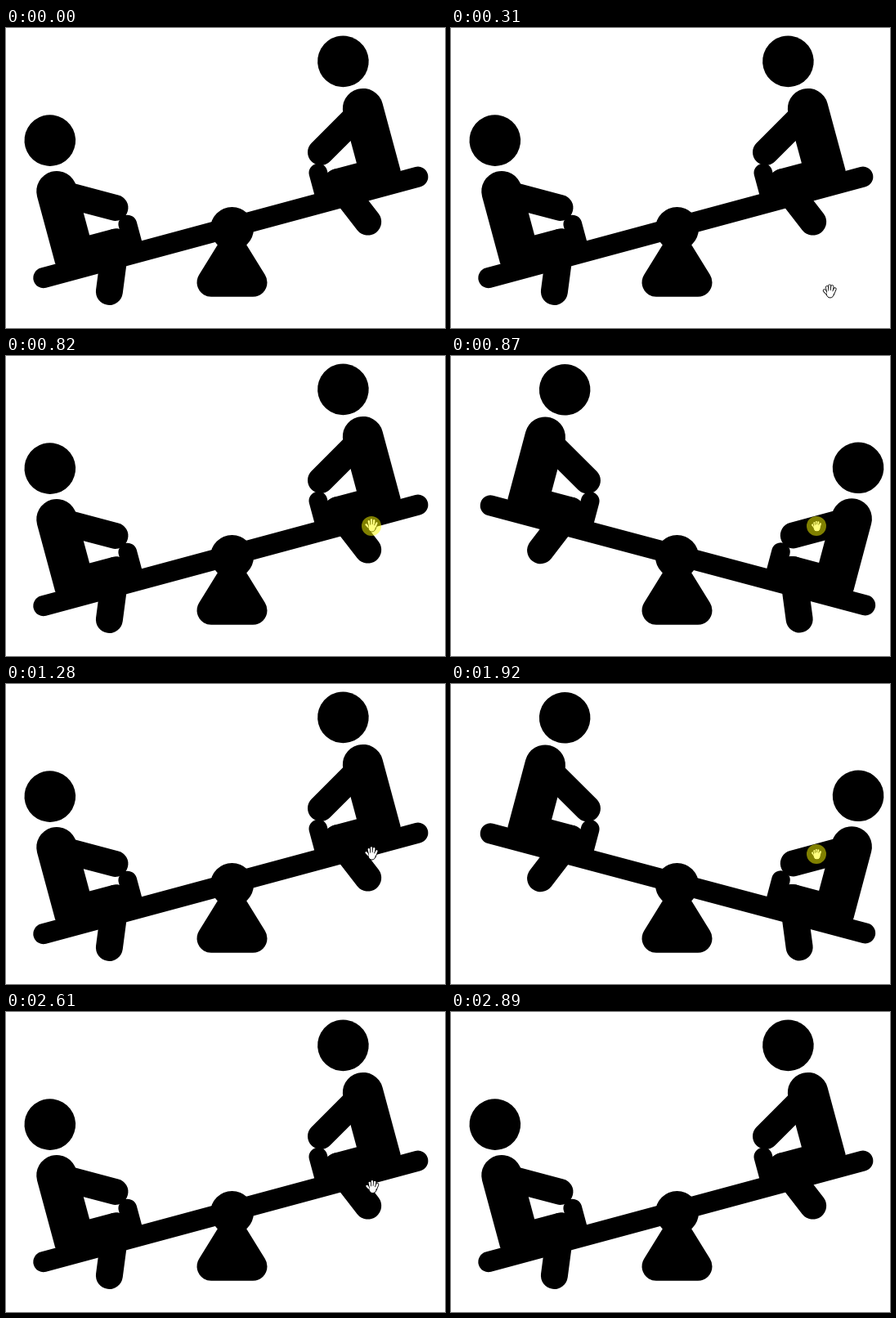
Write an HTML page with a canvas that moves like this. It is 537 by 367 pixels and loops after 3.31 s.

```html
<!DOCTYPE html>
<html lang="en">
<head>
<meta charset="utf-8">
<title>Seesaw</title>
<style>
  html, body { margin: 0; width: 100%; height: 100%; overflow: hidden; background: #fff; }
  canvas { display: block; }
</style>
</head>
<body>
<canvas id="stage" width="537" height="367"></canvas>
<script>
const ctx = document.getElementById('stage').getContext('2d');
const LOOP = 3310;
const PIVOT = { x: 276.15, y: 248.7 };
const REST = { x: 447, y: 207 };
const OUTSIDE = { x: 468, y: 356 };

function disc(x, y, r) {
  ctx.beginPath();
  ctx.arc(x, y, r, 0, Math.PI * 2);
  ctx.fill();
}

function limb(x1, y1, x2, y2, width) {
  ctx.lineWidth = width;
  ctx.beginPath();
  ctx.moveTo(x1, y1);
  ctx.lineTo(x2, y2);
  ctx.stroke();
}

// Both riders share one shape, measured from the middle of the beam.
function drawRider() {
  const hip = { x: 185, y: -19.2 };
  const knee = { x: 140.3, y: -19.2 };
  disc(185.7, -160.2, 31.3);
  ctx.beginPath();
  ctx.roundRect(169.2, -122.8, 49.6, 117, [24.8, 24.8, 8, 8]);
  ctx.fill();
  limb(hip.x, -91.5, 130.3, -60, 32);
  limb(hip.x, hip.y, knee.x, knee.y, 33);
  limb(knee.x, knee.y, 163.8, 37.2, 33);
  limb(120.7, -36.5, 120.7, 0, 22.7);
}

function drawBoard(degrees) {
  ctx.save();
  ctx.translate(PIVOT.x, PIVOT.y);
  ctx.rotate(degrees * Math.PI / 180);
  ctx.translate(0, -5);
  limb(-237.2, 0, 237.2, 0, 25);
  drawRider();
  ctx.scale(-1, 1);
  drawRider();
  ctx.restore();
}

function drawStand() {
  disc(276.5, 245.5, 26.5);
  ctx.lineWidth = 35;
  ctx.beginPath();
  ctx.moveTo(251, 311.3);
  ctx.lineTo(302, 311.3);
  ctx.lineTo(276.5, 270);
  ctx.closePath();
  ctx.fill();
  ctx.stroke();
}

function drawHand({ x, y }, closed) {
  ctx.save();
  ctx.translate(x, y);
  for (let i = 0; i < 5; i++) {
    const tipX = (3.2 * i - 6.4) * (closed ? 0.75 : 1);
    const tipY = (1.2 * (i - 2.2) ** 2 - 6.5) * (closed ? 0.6 : 1);
    const finger = [tipX, tipY, tipX * 0.6 + 0.4, 2.5];
    ctx.strokeStyle = '#000';
    limb(...finger, 4);
    ctx.strokeStyle = '#fff';
    limb(...finger, 2.4);
  }
  ctx.fillStyle = '#fff';
  ctx.strokeStyle = '#000';
  disc(0.6, 3.3, 4.2);
  ctx.lineWidth = 1;
  ctx.beginPath();
  ctx.arc(0.6, 3.3, 4.7, 0, Math.PI);
  ctx.stroke();
  ctx.restore();
}

function between(a, b, p) {
  return { x: a.x + (b.x - a.x) * p, y: a.y + (b.y - a.y) * p };
}

// The pointer enters and leaves in discrete steps.
function pointerAt(t) {
  if (t < 260 || t >= 2890) return null;
  if (t < 670) {
    const progress = Math.floor((t - 257) / 45.6) / 9;
    return between(REST, OUTSIDE, (1 - progress) ** 2.2);
  }
  if (t < 2580) return REST;
  const progress = Math.floor((t - 2577) / 44.3 + 1) / 7;
  return between(REST, OUTSIDE, Math.min(progress, 1) ** 1.6);
}

const within = (t, from, to) => t >= from && t < to;

function draw(t) {
  const flipped = within(t, 870, 1280) || within(t, 1920, 2300);
  const pressed = flipped || within(t, 820, 870);
  ctx.fillStyle = '#fff';
  ctx.fillRect(0, 0, 537, 367);
  ctx.fillStyle = ctx.strokeStyle = '#000';
  ctx.lineCap = ctx.lineJoin = 'round';
  drawBoard(flipped ? 14.9 : -15.1);
  drawStand();

  const pointer = pointerAt(t);
  if (pointer) drawHand(pointer, flipped);
  if (pressed) {
    ctx.fillStyle = 'rgba(255, 255, 0, 0.5)';
    disc(447, 208, 12);
  }
}

const start = performance.now();
function tick() {
  draw((performance.now() - start) % LOOP);
  requestAnimationFrame(tick);
}
tick();
</script>
</body>
</html>
```
